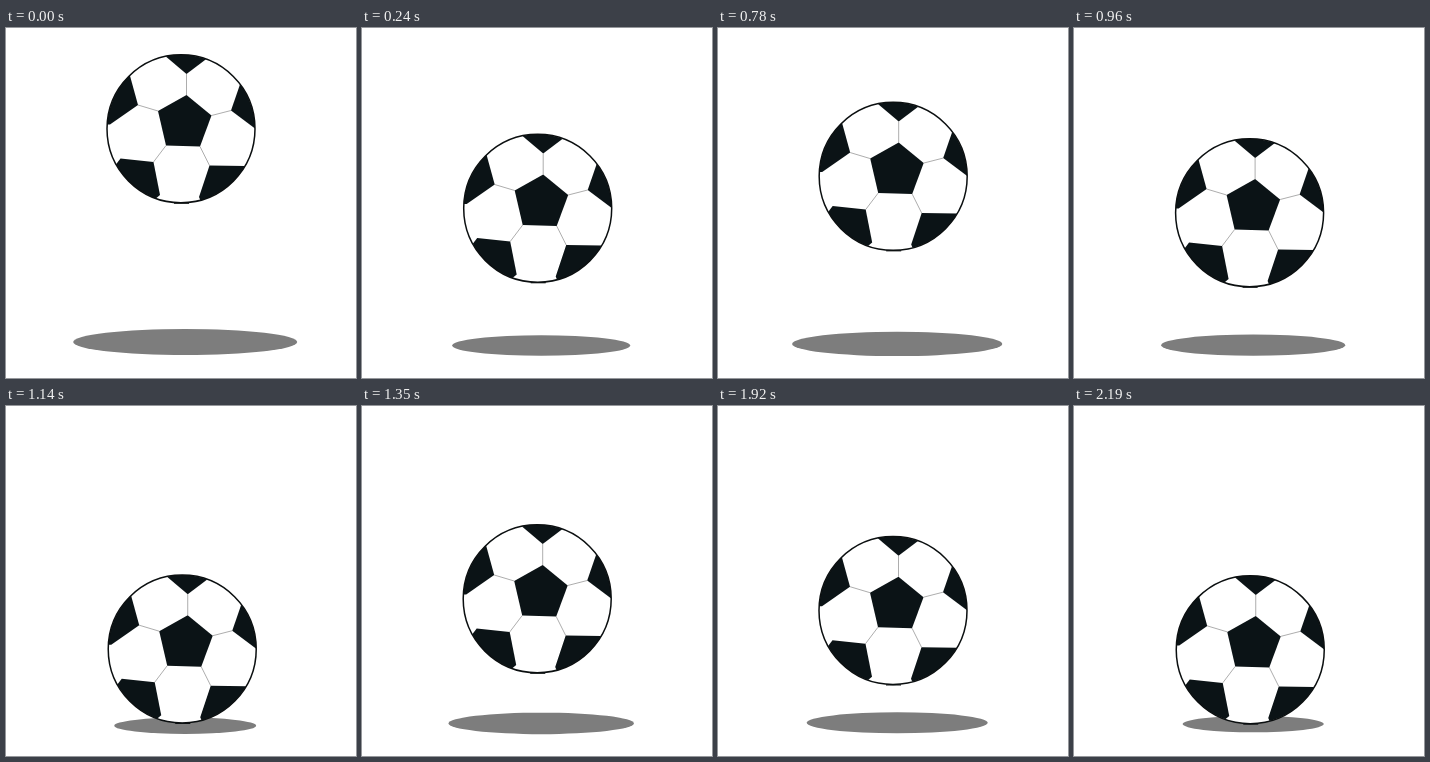
These frames come from a looping animation (350x350 px, 2.22 s). An HTML page:

```html
<!DOCTYPE html>
<html lang="en">
<head>
<meta charset="utf-8">
<title>Bouncing ball</title>
<style>
  html, body { margin: 0; width: 100%; height: 100%; overflow: hidden; background: #fff; }
  svg { display: block; width: 100%; height: 100%; }
</style>
</head>
<body>
<svg viewBox="0 0 350 350">
  <defs>
    <clipPath id="rim"><circle cx="175" cy="74.8" r="74"/></clipPath>
  </defs>
  <ellipse id="shadow" fill="#7d7d7d"/>
  <!-- Ball drawn with its top edge at y = 0 -->
  <g id="ball">
    <circle cx="175" cy="74.8" r="74" fill="#fff"/>
    <g clip-path="url(#rim)">
      <path fill="none" stroke="#999" stroke-width=".8"
        d="M180.5 41V20M205.5 61.5L225 56.5M194 92.5L203.5 111.5M160 91.5L147.5 108M152 57L132 51"/>
      <g fill="#0b1316">
        <path d="M180.5 41L205.5 61.5L194 92.5L160 91.5L152 57Z"/>
        <path d="M158 1L180.5 20L203 3V-5H158Z"/>
        <path d="M234.5 29L225 56.5L249 74.5H256V29Z"/>
        <path d="M123.5 20L132 51L104 70.5H95V20Z"/>
        <path d="M114.5 104.5L147.5 108L154 141L148 146L95 150L108 113Z"/>
        <path d="M203.5 111.5L239 112H250V155H198L193 143Z"/>
      </g>
    </g>
    <circle cx="175" cy="74.8" r="74" fill="none" stroke="#0b0f10" stroke-width="1.5"/>
    <path d="M168 149.2H183" stroke="#0b0f10" stroke-width="1.2"/>
  </g>
</svg>
<script>
const STEP = 30, LOOP = 2220;

// step, ball top, ball drift, shadow radius, shadow centre y
const keys = [
  [0, 26, 0, 112, 314],
  [8, 105.5, .7, 89, 317.5],
  [15.2, 176.5, 1.3, 68.5, 320],
  [20, 131, .7, 84.5, 318.5],
  [27, 64, .1, 108.5, 315.5],
  [32, 110, .6, 92, 317.2],
  [38.7, 175, 1.3, 68.5, 320],
  [45, 118, .2, 92.7, 317.4],
  [47, 102, 0, 98.5, 317],
  [55.5, 175, 1.3, 68.5, 320],
  [64, 129.7, 0, 90.5, 316.8],
  [65, 128, 0, 91, 316.7],
  [74, 174, 1.4, 68, 318.3]
];

const ball = document.getElementById('ball');
const shadow = document.getElementById('shadow');

function pose(step) {
  const i = keys.findIndex(k => k[0] > step);
  const a = keys[i - 1], b = keys[i];
  const p = (step - a[0]) / (b[0] - a[0]);
  return a.map((v, n) => v + (b[n] - v) * p);
}

function draw(ms) {
  const [, top, drift, rx, cy] = pose(Math.floor((ms % LOOP) / STEP));
  ball.setAttribute('transform', `translate(${drift} ${top})`);
  shadow.setAttribute('cx', 179.2);
  shadow.setAttribute('cy', cy);
  shadow.setAttribute('rx', rx);
  shadow.setAttribute('ry', rx * .116);
}

function tick() {
  draw(performance.now() - start);
  requestAnimationFrame(tick);
}

const start = performance.now();
tick();
</script>
</body>
</html>
```
